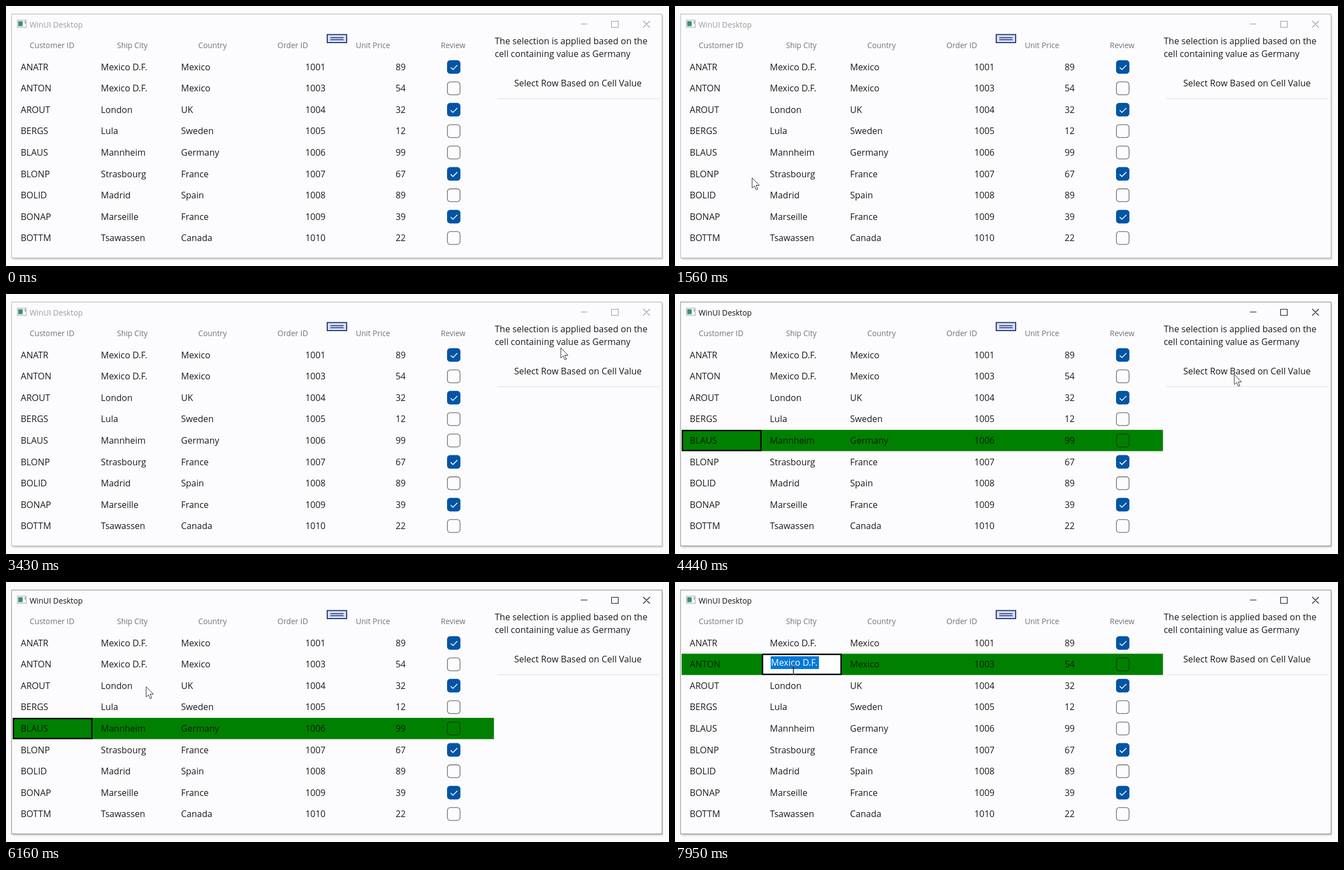
An HTML page that plays this animation: 1195 by 469 pixels, repeating every 8 s.

```html
<!DOCTYPE html>
<html lang="en">
<head>
<meta charset="utf-8">
<title>Row selection</title>
<style>
html, body { margin: 0; width: 100%; height: 100%; overflow: hidden; background: #fcfcfe; }
svg { display: block; width: 100%; height: 100%; }
text { font: 16px "Open Sans", "Noto Sans", sans-serif; fill: #1b1b1b; white-space: pre; }
.head { font-size: 13.75px; fill: #737373; text-anchor: middle; }
.num { text-anchor: end; }
#title { font-size: 13.85px; }
</style>
</head>
<body>
<svg id="stage" viewBox="0 0 1195 469" xmlns="http://www.w3.org/2000/svg">
  <defs>
    <filter id="soft" x="-5%" y="-5%" width="110%" height="110%"><feGaussianBlur stdDeviation="1.6"/></filter>
    <linearGradient id="teal" x2="0.6" y2="1">
      <stop stop-color="#3f7f9c"/><stop offset="1" stop-color="#2f9a6c"/>
    </linearGradient>
  </defs>
  <rect width="1195" height="469" fill="#fcfcfe"/>
  <rect x="12" y="17" width="1172" height="440" fill="#c9c9c4" filter="url(#soft)"/>
  <rect id="frame" x="10" y="14.5" width="1172.5" height="440" fill="#fcfcfe"/>

  <g id="icon">
    <rect x="20.5" y="25.5" width="16" height="13" fill="#fff" stroke="#a3a3a3"/>
    <rect x="22" y="27.5" width="8" height="9" fill="url(#teal)"/>
    <path d="M34.5 27.5v4" stroke="#4f8f70" stroke-width="1.5"/>
  </g>
  <text id="title" x="42.5" y="38.5">WinUI Desktop</text>
  <path id="buttons" d="M1036 32.5h12M1091.5 27.5h12v11h-12zM1148.5 27l12 12M1160.5 27l-12 12" fill="none" stroke-width="1.1"/>

  <g id="selection">
    <rect id="band" x="12" width="867.5" height="38.4" fill="#008000"/>
    <rect id="cell" width="141.5" height="36" stroke="#000" stroke-width="2.4"/>
  </g>
  <g id="grid"></g>
  <g id="editor">
    <rect x="172.5" y="134" width="87" height="23" fill="#0078d7"/>
    <text x="173" y="151.3" style="fill:#fff">Mexico D.F.</text>
  </g>

  <g stroke="#1d2c66">
    <rect x="579" y="51.5" width="35" height="14.5" fill="#d3dffa" stroke-width="1.8"/>
    <path d="M584.5 57.3h24M584.5 60.7h24" stroke-width="1.4"/>
  </g>
  <text x="881" y="69">The selection is applied based on the</text>
  <text x="881" y="91.5">cell containing value as Germany</text>
  <text x="916" y="144.6">Select Row Based on Cell Value</text>
  <path d="M885.5 167h292" stroke="#d9d9e6"/>

  <path id="arrow" d="M0 0V18.4L4.3 14.5L7.3 21.6L10.1 20.4L7.2 13.5H13Z" fill="#fff" stroke="#2a2a2a" stroke-width="1" stroke-linejoin="round"/>
  <g id="beam" fill="none">
    <path d="M209.5 148.5l4 3.2l4 -3.2" stroke="#c9823f" stroke-width="1.6"/>
    <path d="M213.5 151.5V165" stroke="#222" stroke-width="1.6"/>
    <path d="M208.5 165.5h10" stroke="#777" stroke-width="1.6"/>
  </g>
</svg>
<script>
const $ = id => document.getElementById(id);
const NS = "http://www.w3.org/2000/svg";
const LOOP = 8000, STEP = 78, PHASE = 1003;
const ROW_TOP = 90.8, ROW_H = 38.56, COL_W = 144.5;

const heads = ["Customer ID", "Ship City", "Country", "Order ID", "Unit Price", "Review"];
const rows = [
  ["ANATR", "Mexico D.F.", "Mexico", 1001, 89, true],
  ["ANTON", "Mexico D.F.", "Mexico", 1003, 54, false],
  ["AROUT", "London", "UK", 1004, 32, true],
  ["BERGS", "Lula", "Sweden", 1005, 12, false],
  ["BLAUS", "Mannheim", "Germany", 1006, 99, false],
  ["BLONP", "Strasbourg", "France", 1007, 67, true],
  ["BOLID", "Madrid", "Spain", 1008, 89, false],
  ["BONAP", "Marseille", "France", 1009, 39, true],
  ["BOTTM", "Tsawassen", "Canada", 1010, 22, false]
];

// Pointer stops: time, x, y
const stops = [
  [460, 66, 392], [850, 112, 338], [1003, 118, 333], [1549, 139, 310], [1790, 143, 306],
  [2640, 940, 128], [2720, 950, 122], [3421, 1000, 97], [3570, 1000, 97], [4120, 1008, 145],
  [4515, 1008, 145], [5215, 364, 262], [5440, 360, 258], [5530, 360, 258],
  [6070, 262, 196], [6385, 205, 153], [LOOP, 205, 153]
];

function add(tag, attrs, label) {
  const el = document.createElementNS(NS, tag);
  for (const key in attrs) el.setAttribute(key, attrs[key]);
  if (label !== undefined) el.textContent = label;
  $("grid").appendChild(el);
  return el;
}

function checkbox(y, on) {
  const box = add("rect", {
    x: 795.6, y: y - 11.6, width: 22.8, height: 23.2, rx: 5,
    fill: on ? "#0055a4" : "none", stroke: on ? "#0055a4" : "#6b6b6b", "stroke-width": 1.3
  });
  if (on) add("path", {
    d: `M801.5 ${y + 0.8}l4 4l8 -8`, fill: "none", stroke: "#fff", "stroke-width": 1.5
  });
  return box;
}

heads.forEach((h, i) => add("text", { class: "head", x: 83 + i * 144.6, y: 75.6 }, h));

const rowParts = rows.map((row, r) => {
  const mid = 110 + r * ROW_H;
  const texts = row.slice(0, 5).map((value, c) => c < 3
    ? add("text", { x: 26.5 + c * COL_W, y: mid + 5.8 }, value)
    : add("text", { class: "num", x: 576 + (c - 3) * COL_W, y: mid + 5.8 }, value));
  return { texts, box: checkbox(mid, row[5]) };
});

function pointer(t) {
  const i = Math.max(1, stops.findIndex(s => s[0] > t));
  const [t0, x0, y0] = stops[i - 1], [t1, x1, y1] = stops[i];
  const u = Math.min(1, Math.max(0, (t - t0) / (t1 - t0)));
  const e = u * u * (3 - 2 * u);
  return [x0 + (x1 - x0) * e, y0 + (y1 - y0) * e];
}

const show = (id, on) => $(id).setAttribute("visibility", on ? "visible" : "hidden");

function draw(t) {
  const active = t >= 4288, editing = t >= 7638;
  const picked = t >= 6696 ? 1 : t >= 4436 ? 4 : -1;

  $("frame").setAttribute("stroke", active ? "#80816f" : "#b0b0ac");
  $("title").style.fill = active ? "#111" : "#9b9b9b";
  $("buttons").setAttribute("stroke", active ? "#111" : "#999");

  show("selection", picked >= 0);
  if (picked >= 0) {
    const y = ROW_TOP + picked * ROW_H;
    const col = picked === 1 ? 1 : 0;
    $("band").setAttribute("y", y);
    $("cell").setAttribute("x", 13.3 + col * COL_W);
    $("cell").setAttribute("y", y + 1.2);
    $("cell").setAttribute("fill", editing ? "#fff" : "none");
  }
  rowParts.forEach(({ texts, box }, r) => {
    const on = r === picked;
    texts.forEach(el => { el.style.fill = on ? "#061a06" : ""; });
    if (!rows[r][5]) box.setAttribute("stroke", on ? "#0b3a0b" : "#6b6b6b");
  });
  rowParts[1].texts[1].setAttribute("visibility", editing ? "hidden" : "visible");
  show("editor", editing);
  show("beam", editing);

  // The pointer is sampled in steps, like a screen capture.
  const held = PHASE + Math.floor((t - PHASE) / STEP) * STEP;
  const [x, y] = pointer(held);
  show("arrow", t >= 468 && !editing);
  $("arrow").setAttribute("transform", `translate(${x.toFixed(1)} ${y.toFixed(1)})`);
}

function tick() {
  draw(performance.now() % LOOP);
  requestAnimationFrame(tick);
}
tick();
</script>
</body>
</html>
```
